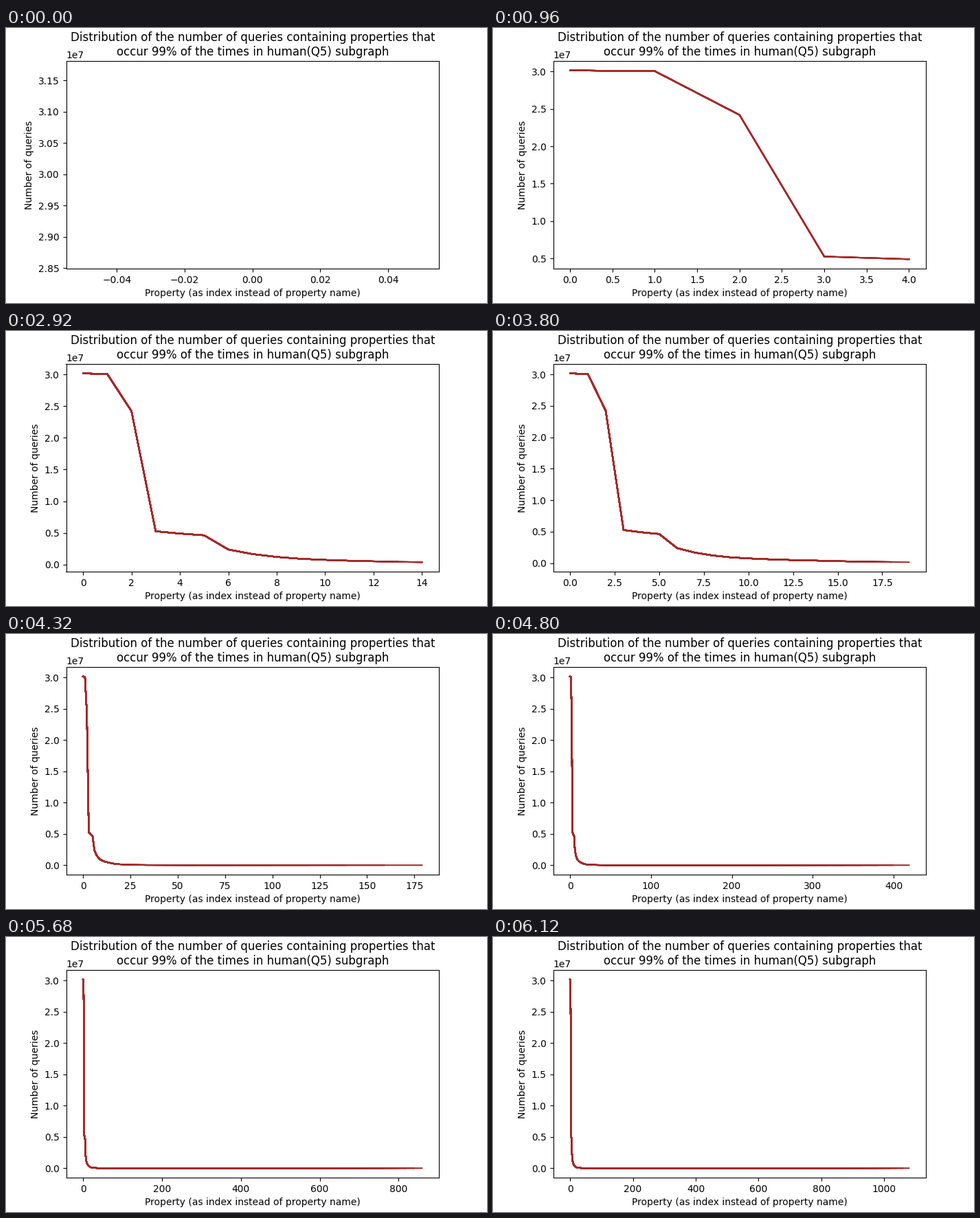
Write a matplotlib script that moves like this. It is 700x400 px and loops after 6160 ms.

```python
import numpy as np
import matplotlib.pyplot as plt
from matplotlib.animation import FuncAnimation

FRAMES = 154
INTERVAL = 40
HOLD = 5      # frames spent on each of the first points
SLOW = 20     # points revealed one by one
STEP = 20     # points added per frame afterwards


def point_count(i):
    if i < SLOW * HOLD:
        return i // HOLD + 1
    return SLOW + STEP * (i - SLOW * HOLD)


# The falling curve: power-law pieces between a few key points.
key_index = np.array([0, 1, 2, 3, 5, 6, 9, 14, 19, 34, 1080])
key_value = 1e7 * np.array([3.0151, 3.006, 2.42, 0.526, 0.463, 0.239,
                            0.092, 0.039, 0.015, 0.0028, 1e-6])
index = np.arange(point_count(FRAMES - 1))
queries = np.exp(np.interp(np.log1p(index), np.log1p(key_index),
                           np.log(key_value)))

plt.rcParams["font.family"] = "DejaVu Sans"
fig, ax = plt.subplots(figsize=(7, 4), dpi=100)
fig.subplots_adjust(left=0.125, right=0.9, bottom=0.125, top=0.88)
ax.set_title("Distribution of the number of queries containing properties that\n"
             "occur 99% of the times in human(Q5) subgraph", y=1.0)
ax.set_xlabel("Property (as index instead of property name)")
ax.set_ylabel("Number of queries")

# Each frame adds one more line on top, so older stretches look heavier.
lines = []
for i in range(FRAMES):
    n = point_count(i)
    lines += ax.plot(index[:n], queries[:n], color="brown", lw=1.5)


def update(i):
    for k, line in enumerate(lines):
        line.set_visible(k <= i)
    ax.relim(visible_only=True)
    ax.autoscale_view()
    return lines


anim = FuncAnimation(fig, update, frames=FRAMES, interval=INTERVAL,
                     init_func=lambda: update(0), repeat=True, blit=False)
plt.show()
```
